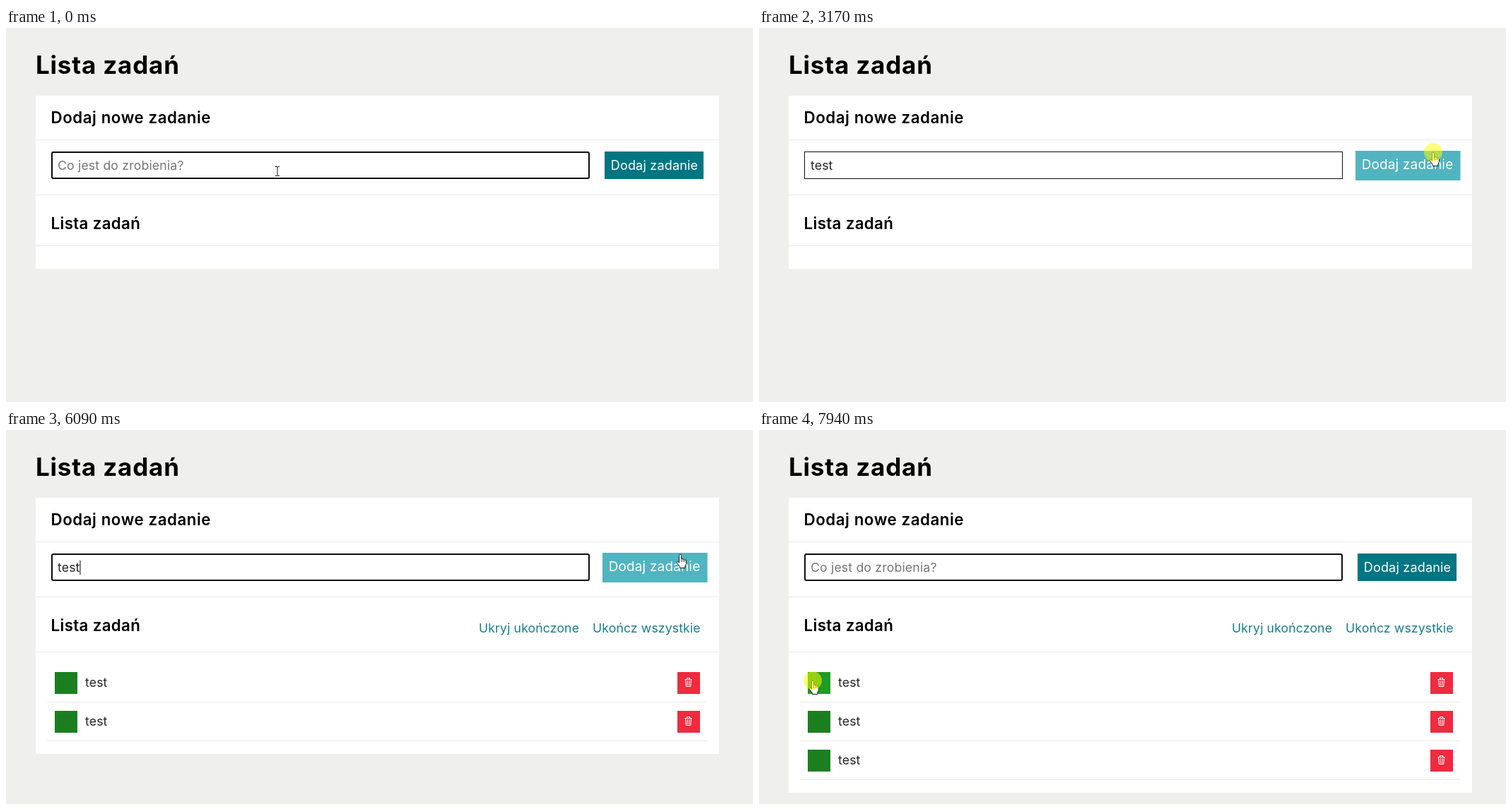
An HTML page for the animation above (8 s loop, 1057 px wide and 530 px high).

```html
<!DOCTYPE html>
<html lang="pl">
<head>
<meta charset="utf-8">
<title>Lista zadań</title>
<style>
  html, body { margin: 0; width: 100%; height: 100%; overflow: hidden; background: #efefed; }
  svg { display: block; width: 100%; height: 100%; }
  text { font: 400 17.7px Inter, "Open Sans", sans-serif; letter-spacing: .1px; fill: #262626; white-space: pre; }
  .h1 { font-size: 35px; font-weight: 700; letter-spacing: .8px; fill: #000; }
  .h2 { font-size: 22.3px; font-weight: 600; letter-spacing: .55px; fill: #000; }
  .hint { letter-spacing: .15px; fill: #757575; }
  .link { fill: #12808b; }
  .label { font-size: 18px; letter-spacing: .2px; fill: #fff; text-anchor: middle; }
  .line { fill: #e9e9e9; }
  .bin { fill: none; stroke: #fff; }
  .pointer { fill: #fff; stroke: #1b1b1b; stroke-linejoin: round; }
</style>
</head>
<body>
<svg viewBox="0 0 1057 530">
  <defs>
    <g id="row">
      <rect x="69" y="343" width="32" height="31" fill="#1b7f20"/>
      <text x="112" y="364">test</text>
      <rect x="950" y="343" width="32" height="31" fill="#ee2b3f"/>
      <path class="bin" d="M960.5 353.5h10M963.5 353v-1.5h4v1.5M961.5 354l.8 9.5h6.400l.8-9.500M964 355l.3 7.500M967 355l-.3 7.500"/>
      <rect class="line" x="58" y="385" width="934" height="1"/>
    </g>
  </defs>
  <text class="h1" x="42" y="65">Lista zadań</text>
  <rect id="card" x="42" y="96" width="967" fill="#fff"/>
  <text class="h2" x="63.500" y="134.500">Dodaj nowe zadanie</text>
  <rect class="line" x="42" y="158" width="967" height="1"/>
  <rect id="field" fill="#fff" stroke="#0c0c0c"/>
  <text id="hint" class="hint" x="73" y="201">Co jest do zrobienia?</text>
  <text id="value" x="73" y="201"></text>
  <rect id="caret" y="185" width="1" height="20"/>
  <rect id="button"/>
  <text id="label" class="label">Dodaj zadanie</text>
  <rect class="line" x="42" y="236" width="967" height="1"/>
  <text class="h2" x="63.500" y="285" style="letter-spacing:.35px">Lista zadań</text>
  <rect id="divider" class="line" x="42" width="967" height="1"/>
  <g id="links">
    <text class="link" x="669" y="287">Ukryj ukończone</text>
    <text class="link" x="830" y="287">Ukończ wszystkie</text>
  </g>
  <g id="rows">
    <use href="#row"/>
    <use href="#row" y="55"/>
    <use href="#row" y="110"/>
  </g>
  <rect id="glow" x="69" y="343" width="32" height="31" fill="#1f9c22"/>
  <g id="cursor">
    <path id="beam" d="M-3 -6.500h2.500l.5.500.500-.500h2.500M0 -6v12M-3 6.500h2.500l.500-.500.500.500h2.500" fill="none" stroke="#111"/>
    <path id="arrow" class="pointer" d="M0 0V14.500L3.400 11.400 5.600 16.200 7.900 15.200 5.800 10.500H10.300Z"/>
    <g id="hand">
      <path class="pointer" d="M-1.500 1.500Q-1.500 0 0 0T1.500 1.500V6.500Q3 5.600 4 7.200 5.400 6.500 6.300 8 8.500 7.600 8.500 9.800V13.500L6.800 17V19.500H-.500V17.800L-4.600 12.500Q-5.500 10.500-3.500 10.200L-1.500 12Z"/>
      <path d="M1.500 7v4M4 7.500v3.500M6.300 8.300V11" fill="none" stroke="#1b1b1b" stroke-width=".8"/>
    </g>
  </g>
  <circle id="click" r="13" fill="#ff0" fill-opacity=".53"/>
</svg>
<script>
const LOOP = 8000, STEP = 68, BLINK = 530, FADE = 300, WORD = 'test';

// Each round types WORD between two times; pace bends the key rhythm
const rounds = [
  { first: 70, last: 530, pace: 2, submit: 3240 },
  { first: 3900, last: 4500, pace: 1, submit: 4630 },
  { first: 5490, last: 6090, pace: 1, submit: 6220 }
];
const blurred = { from: 2020, to: 3240 };
const hovers = [{ from: 1410, to: 1478 }, { from: 2680, to: 6890 }];
const clicks = [{ from: 2020, to: 2220 }, { from: 3100, to: 3240 }, { from: 7930, to: LOOP }];

// Pointer strokes, each a curve from where the previous one ended
const home = [384, 203];
const strokes = [
  { from: 1070, to: 1410, bend: [680, 85], end: [948, 186] },
  { from: 1410, to: 1750, bend: [975, 236], end: [971, 214] },
  { from: 2610, to: 2950, bend: [960, 192], end: [954, 176] },
  { from: 6772, to: 7588, bend: [665, 417], end: [119, 371] },
  { from: 7592, to: 7932, bend: [97, 361], end: [76, 355] }
];

const el = id => document.getElementById(id);
const set = (id, attrs) => {
  for (const name in attrs) el(id).setAttribute(name, attrs[name]);
};
const show = (id, on) => set(id, { visibility: on ? 'visible' : 'hidden' });
const during = (t, span) => t >= span.from && t < span.to;
const clamp = x => Math.min(1, Math.max(0, x));
const smooth = x => clamp(x) ** 2 * (3 - 2 * clamp(x));
const easeOut = x => 1 - (1 - clamp(x)) ** 3;
const inside = ([x, y], l, t, r, b) => x >= l && x < r && y >= t && y < b;
const mix = (a, b, k) => `rgb(${a.map((v, i) => Math.round(v + (b[i] - v) * k))})`;

const keyTimes = ({ first, last, pace }) =>
  [...WORD].map((_, i) => first + (last - first) * (i / (WORD.length - 1)) ** pace);

function pointerAt(t) {
  let p = home;
  for (const { from, to, bend, end } of strokes) {
    if (t < from) break;
    const held = Math.floor((t - from) / STEP) * STEP;
    const u = easeOut(held / (to - from));
    p = p.map((v, i) => (1 - u) ** 2 * v + 2 * u * (1 - u) * bend[i] + u * u * end[i]);
  }
  return p;
}

function drawField(t) {
  const round = rounds.find(r => t < r.submit);
  const keys = round ? keyTimes(round).filter(k => k <= t) : [];
  const value = WORD.slice(0, keys.length);
  const focused = !during(t, blurred);
  const edge = focused ? 2 : 1;
  set('field', {
    x: 64 + edge / 2, y: 175 + edge / 2, width: 762 - edge, height: 39 - edge,
    rx: focused ? 2 : 0, 'stroke-width': edge
  });
  el('value').textContent = value;
  show('hint', !value);

  const restarts = [blurred.to, ...rounds.flatMap(keyTimes)].filter(k => k <= t);
  const sinceKey = t - Math.max(...restarts);
  show('caret', focused && restarts.length && sinceKey % (2 * BLINK) < BLINK);
  set('caret', { x: 73 + (value ? el('value').getComputedTextLength() : 0) });
}

function drawButton(t) {
  const span = hovers.find(s => t >= s.from && t < s.to + FADE);
  const lift = span ? 1 : 0;
  const h = span
    ? smooth((Math.min(t, span.to) - span.from) / FADE) * (1 - smooth((t - span.to) / FADE))
    : 0;
  const x = 847 - 3 * h, y = 175 - h;
  set('button', {
    x, y,
    width: 987 + 2 * lift + 3.5 * h - x,
    height: 214 + lift + h - y,
    fill: mix([0, 118, 130], [82, 180, 192], h)
  });
  set('label', { transform: `translate(917.5 ${201 - lift}) scale(${1 + .05 * h})` });
}

function drawList(t) {
  const count = rounds.filter(r => r.submit <= t).length;
  set('card', { height: count ? 253 + 55 * count : 245.5 });
  set('divider', { y: count ? 314 : 308 });
  show('links', count);
  [...el('rows').children].forEach((row, i) =>
    row.setAttribute('visibility', i < count ? 'visible' : 'hidden'));
  set('glow', { opacity: smooth((t - 7730) / 200) });
}

function drawPointer(t) {
  const p = pointerAt(t);
  const hand = inside(p, 847, 175, 988, 214) || inside(p, 69, 343, 101, 374);
  const beam = inside(p, 64, 175, 826, 214);
  set('cursor', { transform: `translate(${p})` });
  show('hand', hand);
  show('beam', beam);
  show('arrow', !hand && !beam);
  show('click', clicks.some(c => during(t, c)));
  set('click', { cx: p[0], cy: p[1] });
}

const begin = performance.now();
function draw() {
  const t = (performance.now() - begin) % LOOP;
  drawField(t);
  drawButton(t);
  drawList(t);
  drawPointer(t);
  requestAnimationFrame(draw);
}
draw();
</script>
</body>
</html>
```
